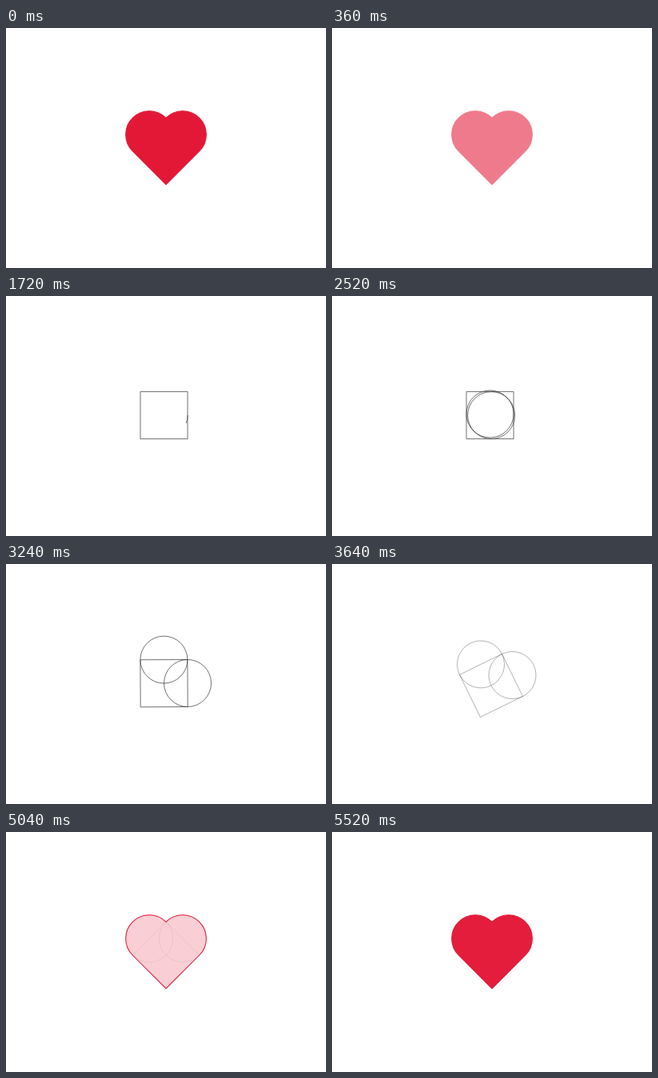
An HTML page with a canvas for the animation above (6000 ms loop, 400 px wide and 300 px high).

```html
<!DOCTYPE html>
<html lang="en">
<head>
<meta charset="utf-8">
<title>Heart construction</title>
<style>
  html, body { margin: 0; width: 100%; height: 100%; overflow: hidden; background: #fff; }
  canvas { display: block; width: 400px; height: 300px; }
</style>
</head>
<body>
<canvas id="stage" width="400" height="300"></canvas>
<script>
const ctx = document.getElementById('stage').getContext('2d');
const LOOP = 6000, STEP = 40, PHASE = 800;
const RED = '#e31837', GREY = '#333';
const SIDE = 59, R = SIDE / 2;
const START = { x: 197.5, y: 149.1 }, END = { x: 200, y: 154 };

const lerp = (a, b, p) => a + (b - a) * p;

// Eased progress of the phase with the given index
function phase(t, index) {
  const p = Math.min(1, Math.max(0, t / PHASE - index));
  return (1 - Math.cos(Math.PI * p)) / 2;
}

function place(p) {
  ctx.translate(lerp(START.x, END.x, p), lerp(START.y, END.y, p));
  ctx.rotate(-Math.PI / 4 * p);
}

function squarePath() {
  ctx.beginPath();
  ctx.moveTo(-R, -R);
  ctx.lineTo(-R, R);
  ctx.lineTo(R, R);
  ctx.lineTo(R, -R);
  ctx.closePath();
}

function circlePath(x, y) {
  ctx.beginPath();
  ctx.arc(x, y, R, 0, Math.PI * 2);
}

function heartPath() {
  ctx.beginPath();
  ctx.arc(R, 0, R, -Math.PI / 2, Math.PI / 2);
  ctx.lineTo(-R, R);
  ctx.lineTo(-R, -R);
  ctx.arc(0, -R, R, Math.PI, Math.PI * 2);
  ctx.closePath();
}

function strokePart(p, length) {
  if (p <= 0) return;
  ctx.setLineDash(p < 1 ? [p * length, length * 2] : []);
  ctx.stroke();
}

function drawGuides(t, turn) {
  const shift = R * phase(t, 3);
  const drawn = phase(t, 2);
  ctx.globalAlpha = lerp(1, 0.1, turn);
  ctx.strokeStyle = GREY;
  ctx.lineWidth = 0.7;
  squarePath();
  strokePart(phase(t, 1), SIDE * 4);
  circlePath(0, -shift);
  strokePart(drawn, Math.PI * SIDE);
  // Both circles coincide until they part
  if (shift > 0) {
    circlePath(shift, 0);
    strokePart(drawn, Math.PI * SIDE);
  }
}

function drawHeart(outline, fill) {
  heartPath();
  ctx.fillStyle = ctx.strokeStyle = RED;
  ctx.lineWidth = 1;
  ctx.globalAlpha = fill;
  ctx.fill();
  ctx.globalAlpha = 1;
  strokePart(outline, SIDE * (Math.PI + 2));
}

function draw(t) {
  ctx.globalAlpha = 1;
  ctx.fillStyle = '#fff';
  ctx.fillRect(0, 0, 400, 300);
  ctx.save();
  if (t < PHASE) {
    place(1);
    drawHeart(1, 1);
    ctx.restore();
    const fade = t < 120 ? 0 : t >= 680 ? 1 : phase(t, 0);
    ctx.globalAlpha = fade;
    ctx.fillStyle = '#fff';
    ctx.fillRect(0, 0, 400, 300);
    return;
  }
  const turn = phase(t, 4);
  place(turn);
  drawGuides(t, turn);
  drawHeart(phase(t, 5), t < 4960 ? 0 : phase(Math.min(t, 5520), 6));
  ctx.restore();
}

const origin = performance.now();
function tick() {
  const t = (performance.now() - origin) % LOOP;
  draw(Math.floor(t / STEP) * STEP);
  requestAnimationFrame(tick);
}
tick();
</script>
</body>
</html>
```
